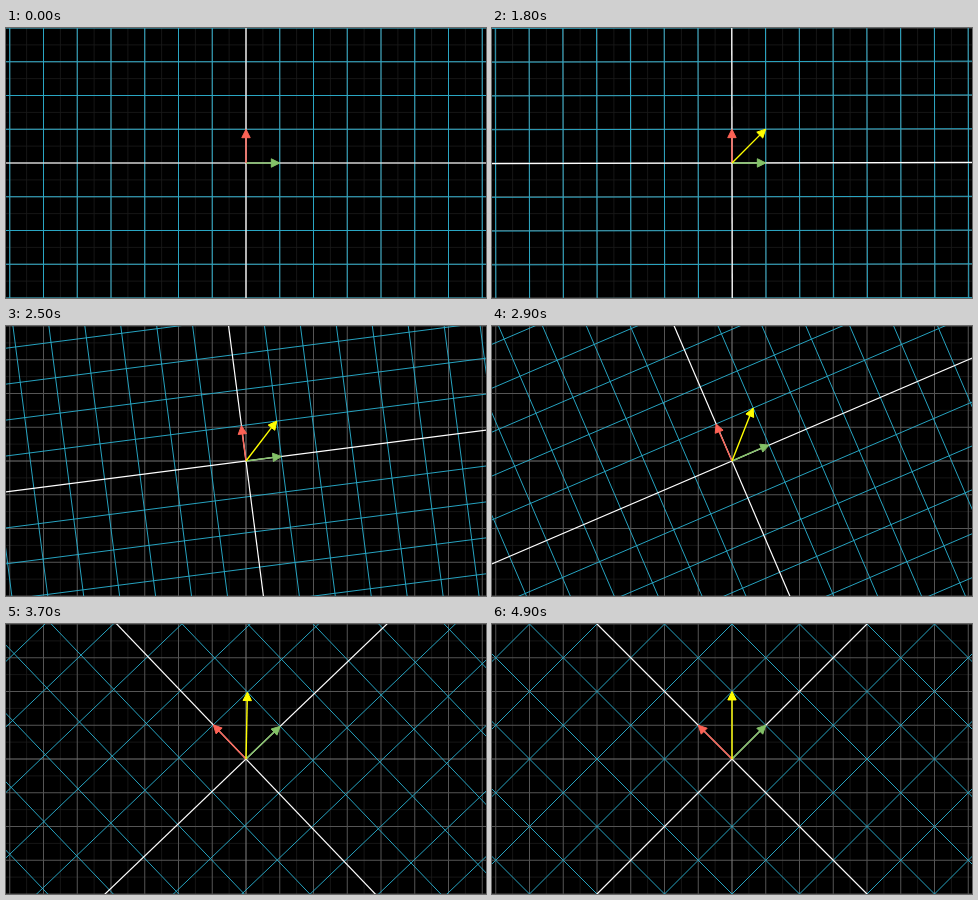
An HTML page with a canvas that plays this animation: 480 by 270 pixels, repeating every 5000 ms.

```html
<!DOCTYPE html>
<html>
<head>
<meta charset="utf-8">
<style>
  html, body { margin: 0; width: 100%; height: 100%; overflow: hidden; background: #000; }
  canvas { display: block; }
</style>
</head>
<body>
<canvas id="stage" width="480" height="270"></canvas>
<script>
const ctx = document.getElementById('stage').getContext('2d');
const UNIT = 33.75, TIP = 0.25 * UNIT, REACH = 900;
const LOOP = 5000, STEP = 100;
const GROW = { start: 127, length: 800 };
const TURN = { start: 1727, length: 2400 };
const ARC = Math.PI / 4;

const sigmoid = x => 1 / (1 + Math.exp(-x));
function progress(time, { start, length }) {
  const x = Math.min(1, Math.max(0, (time - start) / length));
  const edge = sigmoid(-5);
  return (sigmoid(10 * (x - 0.5)) - edge) / (1 - 2 * edge);
}

// Complex numbers as [re, im]
const mul = ([a, b], [c, d]) => [a * c - b * d, a * d + b * c];
const turn = angle => [Math.cos(angle), Math.sin(angle)];

// Factor that carries 1 to 1 + i along a circular arc
function factorAt(s) {
  const centre = [(1 - Math.SQRT2) / 2, 0.5];
  const [x, y] = mul(turn(ARC * s), [1 - centre[0], -centre[1]]);
  return [centre[0] + x, centre[1] + y];
}

function line(from, to, color, width) {
  ctx.strokeStyle = color;
  ctx.lineWidth = width;
  ctx.beginPath();
  ctx.moveTo(from[0], -from[1]);
  ctx.lineTo(to[0], -to[1]);
  ctx.stroke();
}

function grid(factor, first, gap, count, color, width) {
  for (let n = first; n <= count; n += gap) {
    for (const d of n ? [n * UNIT, -n * UNIT] : [0]) {
      line(mul(factor, [d, -REACH]), mul(factor, [d, REACH]), color, width);
      line(mul(factor, [-REACH, d]), mul(factor, [REACH, d]), color, width);
    }
  }
}

function arrow(vector, s, color, size = 1) {
  if (size <= 0) return;
  const length = Math.hypot(...vector);
  const end = mul(factorAt(s), vector.map(v => v * UNIT));
  const u = mul(turn(ARC * s), vector.map(v => v / length));
  const base = [end[0] - TIP * u[0], end[1] - TIP * u[1]];
  const side = [-u[1] * TIP / 2, u[0] * TIP / 2];
  ctx.save();
  ctx.scale(size, size);
  line([0, 0], base, color, 1.4);
  ctx.fillStyle = color;
  ctx.lineWidth = 1;
  ctx.beginPath();
  ctx.moveTo(end[0], -end[1]);
  ctx.lineTo(base[0] + side[0], -base[1] - side[1]);
  ctx.lineTo(base[0] - side[0], -base[1] + side[1]);
  ctx.closePath();
  ctx.fill();
  ctx.stroke();
  ctx.restore();
}

function draw(time) {
  const s = progress(time, TURN);
  const factor = factorAt(s);
  ctx.setTransform(1, 0, 0, 1, 0, 0);
  ctx.fillStyle = '#000';
  ctx.fillRect(0, 0, 480, 270);
  ctx.translate(240, 135);
  grid([1, 0], 0.5, 1, 7.5, '#1c1c1c', 0.8);
  grid([1, 0], 1, 1, 7, '#555', 1);
  grid([1, 0], 0, 1, 0, '#777', 1.1);
  grid(factor, 1, 1, 14, '#29abca', 0.95);
  grid(factor, 0, 1, 0, '#fff', 1.2);
  arrow([1, 0], s, '#83c167');
  arrow([0, 1], s, '#fc6255');
  arrow([1, 1], s, '#ffff00', progress(time, GROW));
}

const began = performance.now();
function tick() {
  const time = (performance.now() - began) % LOOP;
  draw(Math.floor(time / STEP) * STEP);
  requestAnimationFrame(tick);
}
tick();
</script>
</body>
</html>
```
